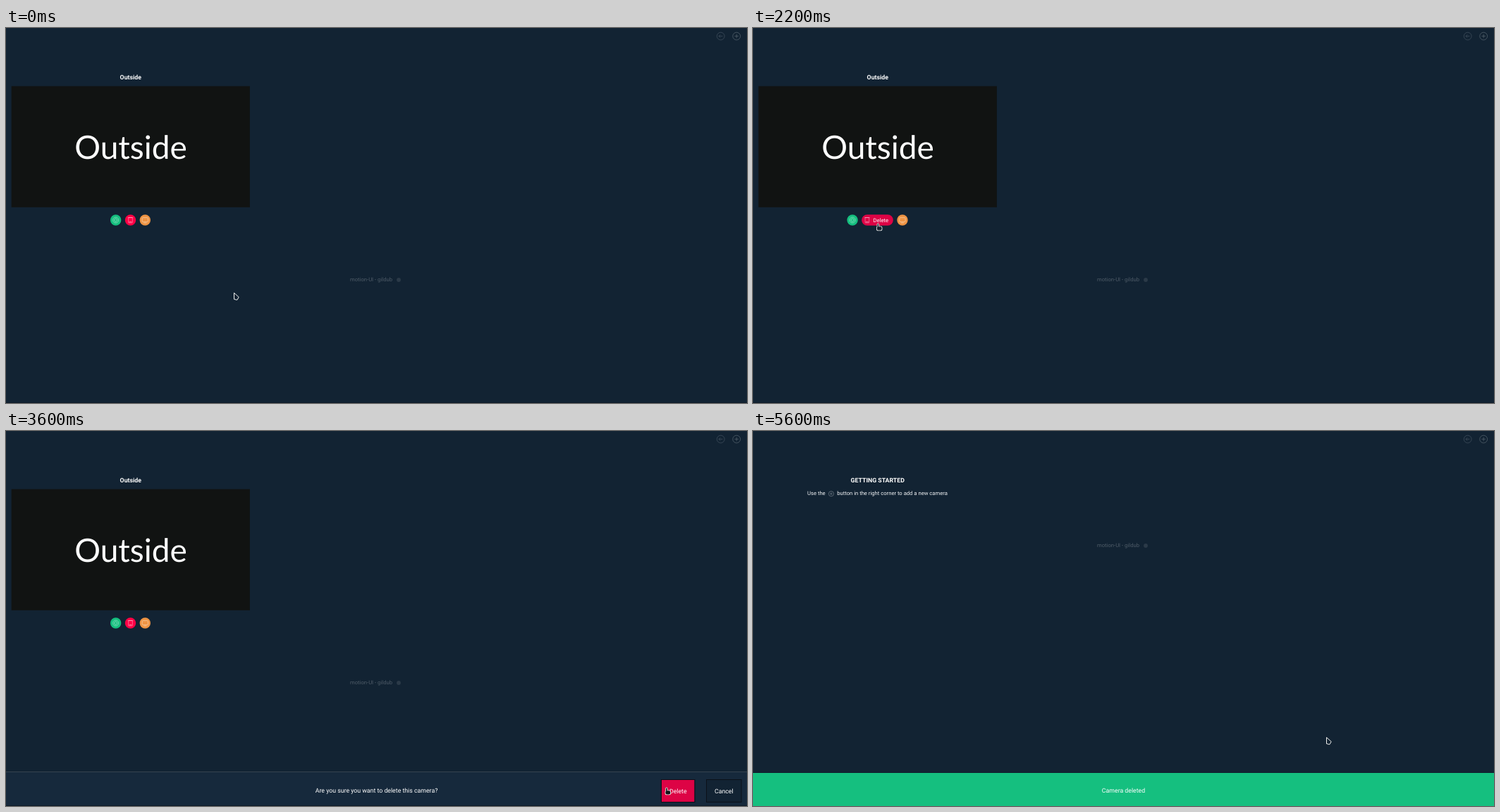
Animation, 1051 px wide and 533 px high, one loop 6800 ms. Source, as an HTML page with a canvas:

```html
<!DOCTYPE html>
<html lang="en">
<head>
<meta charset="utf-8">
<title>Delete a camera</title>
<style>
html, body { margin: 0; width: 100%; height: 100%; overflow: hidden; background: #122333; }
canvas { display: block; }
</style>
</head>
<body>
<canvas id="stage" width="1051" height="533"></canvas>
<script>
const W = 1051, H = 533, LOOP = 6800, STEP = 100;
const BG = '#122333', RED = '#ff0045', RED_HOVER = '#dd0345', GREEN = '#15bf7f', ORANGE = '#ee9444';
const INK = 'rgba(255,255,255,.55)';
const BIG = 8.76, SMALL = 7.66;
const ASK = 2400, HOVER = 3500, DELETED = 4600;
const c = document.getElementById('stage').getContext('2d');
c.textRendering = 'geometricPrecision';

const linear = p => p;
const smooth = p => p * p * (3 - 2 * p);
const progress = (t, from, to) => Math.min(1, Math.max(0, (t - from) / (to - from)));

const legs = [
  { from: 0, to: 900, x: 185, y: 290, ease: linear },
  { from: 900, to: 1200, x: 175, y: 277.5, ease: smooth },
  { from: 2600, to: 3300, x: 905, y: 498, ease: smooth },
  { from: 3400, to: 3700, x: 945, y: 509.5, ease: smooth },
  { from: 4800, to: 5600, x: 813, y: 435, ease: smooth }
];

function pointerAt(t) {
  let x = 323, y = 376;
  for (const leg of legs) {
    const p = leg.ease(progress(t, leg.from, leg.to));
    x += (leg.x - x) * p;
    y += (leg.y - y) * p;
  }
  return { x, y };
}

function pillWidth(t) {
  return 15.4 + 29.3 * (progress(t, 1000, 1200) - progress(t, 3000, 3375));
}

function rect(x, y, w, h, color) {
  c.fillStyle = color;
  c.fillRect(x, y, w, h);
}

function text(str, x, y, size, color = '#fff', align = 'left', weight = 400, family = 'Roboto') {
  c.font = `${weight} ${size}px ${family}, sans-serif`;
  c.textAlign = align;
  c.fillStyle = color;
  c.fillText(str, x, y);
}

function stroke(color, width) {
  c.strokeStyle = color;
  c.lineWidth = width;
  c.stroke();
}

function line(x1, y1, x2, y2, color, width = 0.7) {
  c.beginPath();
  c.moveTo(x1, y1);
  c.lineTo(x2, y2);
  stroke(color, width);
}

function ring(x, y, r, color, width = 0.7) {
  c.beginPath();
  c.arc(x, y, r, 0, Math.PI * 2);
  stroke(color, width);
}

function roundBox(x, y, w, h, r, color, width = 0.7) {
  c.beginPath();
  c.roundRect(x, y, w, h, r);
  stroke(color, width);
}

function pill(x, w, color) {
  c.beginPath();
  c.roundRect(x, 265.3, w, 15.4, 7.7);
  c.fillStyle = color;
  c.fill();
}

function plusIcon(x, y, r, color) {
  const a = r / 2;
  ring(x, y, r, color);
  line(x - a, y, x + a, y, color);
  line(x, y - a, x, y + a, color);
}

function topIcons() {
  const x = 1013.7, y = 11.6, dim = '#465462';
  ring(x, y, 5.4, dim);
  line(x - 2.7, y, x + 2.7, y, dim);
  line(x - 2.7, y, x - 0.5, y - 2.2, dim);
  line(x - 2.7, y, x - 0.5, y + 2.2, dim);
  plusIcon(1036.2, y, 5.4, '#5a6772');
}

function footer(y) {
  text('motion-UI - gildub', 488, y, SMALL, '#4e5b67');
  c.beginPath();
  c.arc(557, y - 2.3, 2.9, 0, Math.PI * 2);
  c.fillStyle = '#2b3a48';
  c.fill();
}

function gearIcon(x, y) {
  c.beginPath();
  for (let a = Math.PI / 8; a < Math.PI * 2; a += Math.PI / 4) {
    c.lineTo(x + 4.2 * Math.cos(a), y + 4.2 * Math.sin(a));
  }
  c.closePath();
  stroke(INK, 0.7);
  ring(x, y, 2.1, INK);
}

function trashIcon(x, y) {
  line(x - 3.8, y - 3.5, x + 3.8, y - 3.5, INK);
  roundBox(x - 2.8, y - 3.5, 5.6, 7.4, 0.6, INK);
  line(x - 1.8, y + 2.6, x + 1.8, y + 2.6, INK, 0.9);
}

function screenIcon(x, y) {
  roundBox(x - 4.1, y - 3.4, 8.2, 6, 1, INK);
  line(x - 2, y + 4, x + 2, y + 4, INK);
}

function buttons(t) {
  const y = 273, r = 7.7, gap = 5.4, w = pillWidth(t);
  const left = 176.5 - w / 2, gearX = left - gap - r, screenX = left + w + gap + r;
  const hover = t >= 1000 && t < 2800;

  pill(gearX - r, r * 2, GREEN);
  gearIcon(gearX, y);
  pill(screenX - r, r * 2, ORANGE);
  screenIcon(screenX, y);

  c.save();
  pill(left, w, hover ? RED_HOVER : RED);
  c.clip();
  trashIcon(left + r, y);
  if (w > r * 2 + 1) text('Delete', left + 16.3, 275.9, SMALL);
  c.restore();
}

function camera(t) {
  text('Outside', 176.8, 73.3, BIG, '#fff', 'center', 700);
  rect(7.7, 82.6, 338.2, 172.2, '#111312');
  text('Outside', 177, 186, 46, '#fff', 'center', 400, 'Lato');
  buttons(t);
  footer(360.3);
}

function tooltip() {
  rect(181, 286, 30, 14, '#10151a');
  text('Delete', 196, 295.8, SMALL, '#e8e8e8', 'center');
}

function dialogButton(x, w, label, color) {
  rect(x, 496, w, 31, color);
  c.strokeStyle = '#0b1119';
  c.lineWidth = 1;
  c.strokeRect(x - 0.5, 495.5, w + 1, 32);
  text(label, x + w / 2, 514.5, BIG, '#fff', 'center');
}

function confirmBar(hover) {
  rect(0, 484, W, 48, '#16293c');
  rect(0, 484, W, 1, '#354350');
  text('Are you sure you want to delete this camera?', 525.5, 513.5, BIG, '#fff', 'center');
  dialogButton(930, 46.5, 'Delete', hover ? RED_HOVER : RED);
  dialogButton(994, 48.5, 'Cancel', BG);
}

function emptyPage() {
  const ink = '#f0f2f4';
  text('GETTING STARTED', 176.7, 73.3, BIG, '#fff', 'center', 700);
  text('Use the', 77, 91.2, SMALL, ink);
  plusIcon(110.9, 89.2, 3.6, '#76818b');
  text('button in the right corner to add a new camera', 119.2, 91.2, SMALL, ink);
  footer(165.3);
  rect(0, 485, W, 1, '#0f1e2c');
  rect(0, 486, W, 47, GREEN);
  text('Camera deleted', 525.5, 514, BIG, '#fff', 'center');
}

function arrowPath() {
  c.moveTo(0.5, 0.5);
  c.lineTo(0.5, 9.5);
  c.lineTo(4.8, 10.5);
  c.lineTo(7.2, 6.5);
  c.closePath();
}

function handPath() {
  c.roundRect(1.5, 0.8, 1.6, 6, 0.8);
  c.roundRect(0.8, 4.8, 6.8, 5.2, 1.8);
}

function drawPointer(t) {
  const { x, y } = pointerAt(t);
  const pointing = (t >= 1000 && t < 2800) || (t >= HOVER && t < DELETED);
  c.save();
  c.translate(x, y);
  c.lineJoin = 'round';
  c.beginPath();
  if (pointing) handPath(); else arrowPath();
  stroke('#f2f2f0', pointing ? 1.6 : 1);
  c.fillStyle = y > 486 ? '#11151a' : '#17222e';
  if (pointing || y > 500) c.fill();
  c.restore();
}

function draw(t) {
  rect(0, 0, W, H, BG);
  rect(0, 532, W, 1, '#0e1b28');
  topIcons();
  if (t < DELETED) {
    camera(t);
    if (t >= 1700 && t < 2200) tooltip();
    if (t >= ASK) confirmBar(t >= HOVER);
  } else {
    emptyPage();
  }
  drawPointer(t);
}

const start = performance.now();
function tick(now) {
  const t = Math.max(0, now - start) % LOOP;
  draw(Math.floor(t / STEP) * STEP);
  requestAnimationFrame(tick);
}
draw(0);
requestAnimationFrame(tick);
</script>
</body>
</html>
```
